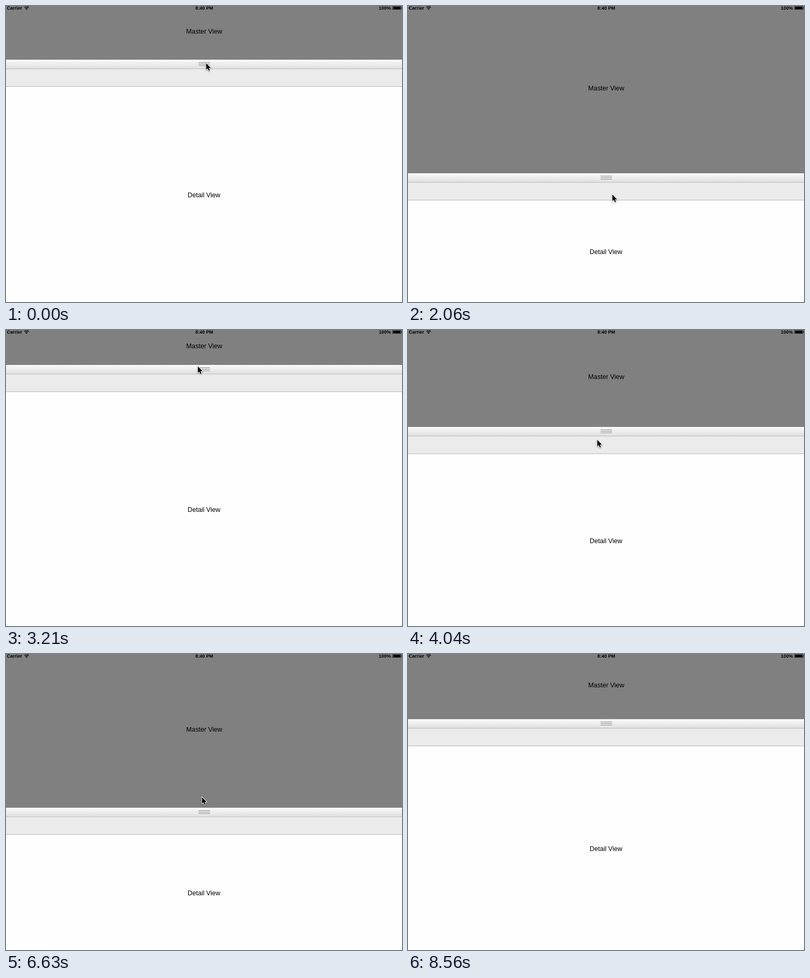
These frames come from a looping animation (761 px wide and 568 px high, 9 s). An HTML page with a canvas:

```html
<!DOCTYPE html>
<html lang="en">
<head>
<meta charset="utf-8">
<title>Split view</title>
<style>
  html, body { margin: 0; width: 100%; height: 100%; overflow: hidden; background: #fefefe; }
  canvas { display: block; }
</style>
</head>
<body>
<canvas id="stage" width="761" height="568"></canvas>
<script>
const ctx = document.getElementById('stage').getContext('2d');
const W = 761, H = 568, LOOP = 9000, GRIP = 7;
const FONT = '"Liberation Sans", Arial, sans-serif';

// The hand eases to a new place and the bar follows a little later.
// bar, hand: [start, end]; sway: sideways bow of the hand's path.
const moves = [
  { barY: 368, handX: 392, hand: [881, 2249], bar: [1510, 2265] },
  { barY: 61, handX: 368, hand: [2381, 3238], bar: [2416, 3273] },
  { barY: 324, handX: 370, hand: [3580, 4454], bar: [3620, 4495], sway: -6 },
  { barY: 124, handX: 392, hand: [6444, 6974], bar: [6500, 7030] },
  { barY: 124, handX: 745, handY: 573, hand: [7670, 8560], bar: [7670, 8560] }
];

// The screen refreshes in bursts: [first, last, count].
const refreshes = [
  [0, 1510, 2], [1880, 2060, 3], [2200, 2320, 2], [2530, 2940, 5],
  [3090, 3330, 3], [3630, 3780, 2], [3910, 4040, 2], [4160, 4630, 6],
  [6630, 6930, 4], [7040, 7160, 2], [7730, 8560, 15]
].flatMap(([first, last, count]) => Array.from({ length: count }, (_, i) =>
  Math.floor(first + (last - first) * i / (count - 1))));

function progress([start, end], time) {
  const u = Math.min(1, Math.max(0, (time - start) / (end - start)));
  return u * u * (3 - 2 * u);
}

function poseAt(time) {
  let barY = 102, x = 384, y = barY + GRIP;
  for (const move of moves) {
    const { handY = move.barY + GRIP, sway = 0 } = move;
    const p = progress(move.hand, time);
    x += (move.handX - x) * p + sway * Math.sin(Math.PI * p);
    y += (handY - y) * p;
    barY += (move.barY - barY) * progress(move.bar, time);
  }
  return [barY, x, y].map(Math.round);
}

function rect(x, y, w, h, color) {
  ctx.fillStyle = color;
  ctx.fillRect(x, y, w, h);
}

function label(text, x, baseline, font, align = 'center') {
  ctx.font = `${font} ${FONT}`;
  ctx.textAlign = align;
  ctx.fillStyle = '#000';
  ctx.fillText(text, x, Math.floor(baseline));
}

function drawStatusBar() {
  label('Carrier', 1.5, 7, 'bold 9px', 'left');
  label('8:40 PM', 381, 7, 'bold 9px');
  label('100%', 739.5, 7, 'bold 9px', 'right');

  ctx.strokeStyle = '#000';
  ctx.lineWidth = 1.2;
  for (const r of [3.3, 5.6]) {
    ctx.beginPath();
    ctx.arc(39.5, 6.6, r, -Math.PI * 0.78, -Math.PI * 0.22);
    ctx.stroke();
  }
  ctx.beginPath();
  ctx.arc(39.5, 6, 1.2, 0, Math.PI * 2);
  ctx.fill();

  ctx.lineWidth = 0.7;
  ctx.strokeRect(742.8, 0.9, 16.2, 5.8);
  rect(744, 1.7, 13.8, 4.2, '#000');
  rect(759.7, 2.6, 1, 2.4, '#000');
}

function drawBar(y) {
  const shine = ctx.createLinearGradient(0, y, 0, y + 18);
  shine.addColorStop(0, '#fff');
  shine.addColorStop(0.15, '#f7f7f7');
  shine.addColorStop(0.5, '#eeeeee');
  shine.addColorStop(1, '#dfdfdf');
  rect(0, y + 1, W, 17, shine);
  for (const offset of [6, 9, 12]) {
    rect(370, y + offset, 22, 1, '#838383');
    rect(370, y + offset + 1, 22, 1, '#f8f8f8');
  }
  rect(0, y + 18, W, 34, '#ebebeb');
  rect(0, y + 18, W, 1, '#bcbcbc');
  rect(0, y + 52, W, 1, '#b8b8b8');
}

const arrow = new Path2D('M0 0V12.6L2.8 10L4.9 14.6L6.9 13.7L5 9.3H9.1Z');

function drawPointer(x, y) {
  ctx.save();
  ctx.translate(x + 0.7, y + 0.7);
  ctx.lineJoin = 'round';
  ctx.lineWidth = 1.8;
  ctx.strokeStyle = '#fff';
  ctx.shadowColor = 'rgba(0, 0, 0, 0.45)';
  ctx.shadowBlur = 2;
  ctx.shadowOffsetY = 1;
  ctx.stroke(arrow);
  ctx.shadowColor = 'transparent';
  ctx.fillStyle = '#000';
  ctx.fill(arrow);
  ctx.restore();
}

function draw(time) {
  const [barY, handX, handY] = poseAt(time);
  rect(0, 0, W, H, '#fefefe');
  rect(0, 0, W, barY + 1, '#808080');
  drawStatusBar();
  label('Master View', 381, barY / 2 + 2, '12.65px');
  label('Detail View', 380.5, barY / 2 + 316.5, '12.65px');
  drawBar(barY);
  drawPointer(handX, handY);
}

function tick() {
  const time = performance.now() % LOOP;
  draw(refreshes.filter(t => t <= time).pop());
  requestAnimationFrame(tick);
}
tick();
</script>
</body>
</html>
```
